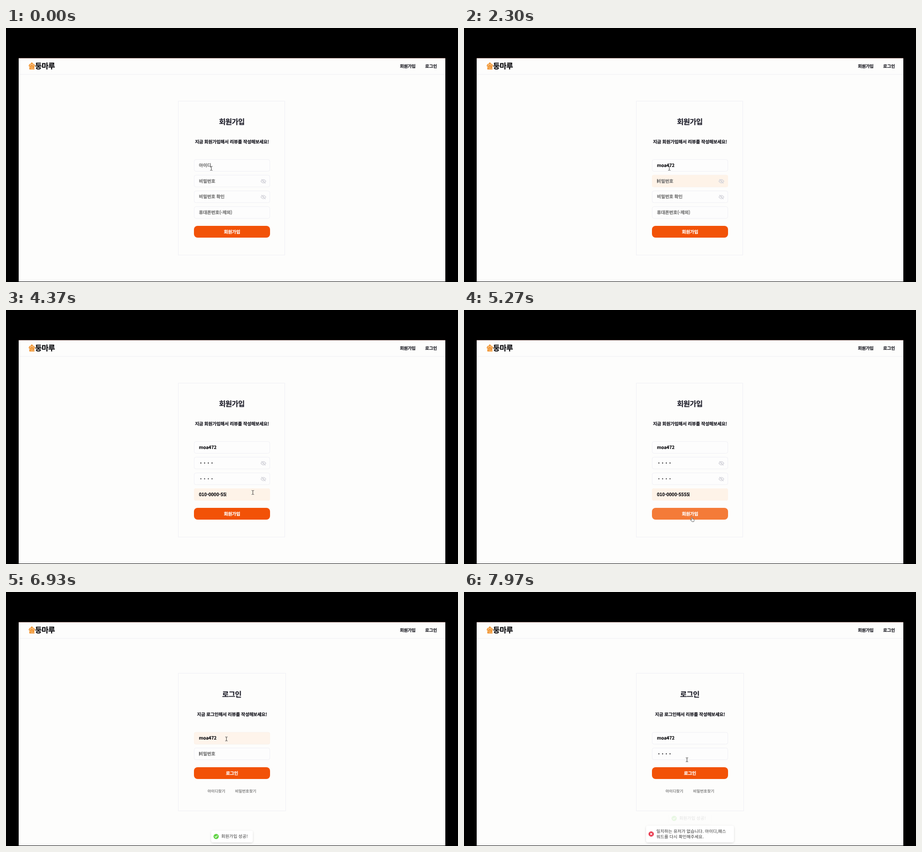
These frames come from a looping animation (998 px wide and 561 px high, 8000 ms). An HTML page:

```html
<!DOCTYPE html>
<html lang="ko">
<head>
<meta charset="utf-8">
<title>회원가입</title>
<style>
  html, body { margin: 0; width: 100%; height: 100%; overflow: hidden; background: #000; }
  svg { display: block; width: 998px; height: 561px; }
  text { font-family: "Noto Sans CJK KR", "Noto Sans CJK", "Noto Sans", sans-serif; text-rendering: geometricPrecision; white-space: pre; }
</style>
</head>
<body>
<svg id="stage" viewBox="0 0 998 561" xmlns="http://www.w3.org/2000/svg"></svg>
<script>
const LOOP = 8000;
const SWAP = 5440;
const INK = '#17171f', HINT = '#757575', LINE = '#efeff4';
const ORANGE = [242, 82, 7], HOVER = [244, 123, 56];
const stage = document.getElementById('stage');

const clamp = v => Math.max(0, Math.min(1, v));
const ramp = (t, start, length) => clamp((t - start) / length);
const easeOut = p => 1 - Math.pow(1 - p, 3);
const smooth = p => p * p * (3 - 2 * p);
const show = (el, on) => el.setAttribute('visibility', on ? 'inherit' : 'hidden');

function add(parent, tag, attrs = {}) {
  const el = document.createElementNS('http://www.w3.org/2000/svg', tag);
  for (const k in attrs) el.setAttribute(k, attrs[k]);
  parent.appendChild(el);
  return el;
}

const box = (parent, x, y, width, height, attrs) =>
  add(parent, 'rect', { x, y, width, height, ...attrs });

// y is the optical middle of the line
function label(parent, str, x, y, size, opts = {}) {
  const { fill = INK, weight = 900, anchor = 'start', gap = 0 } = opts;
  const el = add(parent, 'text', {
    x, y: y + size * 0.365, fill, 'font-size': size, 'font-weight': weight,
    'text-anchor': anchor, 'letter-spacing': gap
  });
  if (weight === 900) {
    el.setAttribute('stroke', fill);
    el.setAttribute('stroke-width', 0.2);
  }
  el.textContent = str;
  return el;
}

function eyeOff(parent, x, y) {
  const g = add(parent, 'g', {
    transform: `translate(${x} ${y})`, fill: 'none', stroke: '#d3d3da', 'stroke-width': 1.3
  });
  add(g, 'path', { d: 'M-5.5 0Q0 -7.5 5.5 0Q0 7.5 -5.5 0Z' });
  add(g, 'circle', { r: 1.7, fill: '#d3d3da', stroke: 'none' });
  add(g, 'path', { d: 'M-4.5 -4.5L4.7 4.7' });
}

const fields = [];
function field(parent, y, hint, opts = {}) {
  box(parent, 415.5, y + 0.5, 167, 26, { rx: 4, fill: '#fdfdfd', stroke: LINE });
  const f = { y, value: '', keys: [], ...opts };
  f.tint = box(parent, 415, y, 168, 27, { rx: 4, fill: '#fef3e8', opacity: 0 });
  f.hint = label(parent, hint, 426, y + 13.5, 9.9, { fill: HINT, gap: -0.1 });
  f.text = label(parent, '', 426, y + 13, 10, { fill: '#0c0c10', gap: -0.1 });
  f.dots = [0, 1, 2, 3].map(i =>
    add(parent, 'circle', { cx: 430.3 + i * 8.2, cy: y + 13.5, r: 1.15, fill: '#0c0c10' }));
  f.caret = box(parent, 0, y + 9, 0.9, 9, { fill: '#222' });
  if (f.eye) eyeOff(parent, 568.3, y + 14);
  fields.push(f);
}

function button(parent, y, str) {
  const el = box(parent, 415, y, 168, 26, { rx: 8, fill: `rgb(${ORANGE})` });
  label(parent, str, 499, y + 13, 10, { fill: '#fff', anchor: 'middle', gap: -0.2 });
  return el;
}

function card(y, width, height, title, titleY, note) {
  const g = add(page, 'g');
  box(g, 380.5, y + 0.5, width, height, { fill: 'none', stroke: LINE });
  label(g, title, 498.5, titleY, 16, { fill: '#20202c', anchor: 'middle', gap: -0.6 });
  label(g, note, 499, titleY + 43.5, 10, { anchor: 'middle', gap: -0.25 });
  return g;
}

const every = (start, step, n) => Array.from({ length: n }, (_, i) => start + i * step);

// Page frame
const defs = add(stage, 'defs');
box(add(defs, 'clipPath', { id: 'view' }), 28, 66, 942, 494);
const soft = add(defs, 'filter', { id: 'soft', x: '-20%', y: '-50%', width: '140%', height: '220%' });
add(soft, 'feDropShadow', { dx: 0, dy: 1.5, stdDeviation: 2.2, 'flood-color': '#000', 'flood-opacity': 0.14 });

box(stage, 0, 0, 998, 561, { fill: '#000' });
const page = add(stage, 'g', { 'clip-path': 'url(#view)' });
box(page, 28, 66, 942, 494, { fill: '#fdfdfc' });
box(page, 28, 65.5, 942, 1.5, { fill: '#6b443d' });
box(page, 28, 102, 942, 1, { fill: LINE });
const brand = label(page, '', 49.5, 83.5, 16.5, { fill: '#08080c', gap: -0.6 });
[['솔', '#f08a1d'], ['둥마루', '#08080c']].forEach(([str, fill]) => {
  add(brand, 'tspan', { fill, stroke: fill }).textContent = str;
});
label(page, '회원가입', 869.7, 84, 9.6, { gap: -0.2 });
label(page, '로그인', 925.5, 84, 9.6, { gap: -0.1 });

// Sign-up card
const USER = 'moa472', PHONE = '010-0000-5555';
const signup = card(161, 235, 340, '회원가입', 207.5, '지금 회원가입해서 리뷰를 작성해보세요!');
field(signup, 290, '아이디', {
  value: USER, keys: [1520, 1600, 1680, 1780, 2040, 2090], tint0: 1400, tint1: 2150, caret1: 2150
});
field(signup, 324.5, '비밀번호', {
  secret: true, eye: true, keys: every(2370, 80, 4), tint0: 2150, tint1: 2790, caret1: 2790
});
field(signup, 359.3, '비밀번호 확인', {
  secret: true, eye: true, keys: every(2960, 90, 4), tint0: 2790, tint1: 3400, caret1: 3690
});
field(signup, 394, '휴대폰번호(-제외)', {
  value: PHONE, keys: every(3760, 56, 13), tint0: 3690, tint1: SWAP, caret1: SWAP
});
const joinButton = button(signup, 437, '회원가입');

// Login card
const login = card(179, 237, 304, '로그인', 226.5, '지금 로그인해서 리뷰를 작성해보세요!');
field(login, 309.5, '아이디', {
  value: USER, keys: every(6400, 85, 6), tint0: 6280, tint1: 6910, caret1: 6910
});
field(login, 344, '비밀번호', {
  secret: true, keys: every(7080, 90, 4), tint0: 6930, caret0: 6910, tint1: 7460, caret1: 7460
});
button(login, 387, '로그인');
label(login, '아이디찾기', 445, 440, 8.5, { fill: '#858585', weight: 700 });
label(login, '비밀번호찾기', 505.8, 440, 8.5, { fill: '#858585', weight: 700, gap: -0.05 });

// Toasts
function toast(x, y, w, h, color, lines, textX, iconX, iconPath) {
  const g = add(page, 'g');
  box(g, x, y, w, h, { rx: 4.5, fill: '#fff', filter: 'url(#soft)' });
  const cy = y + h / 2;
  const icon = add(g, 'g');
  add(icon, 'circle', { r: 5.8, fill: color });
  const mark = add(icon, 'path', {
    d: iconPath, fill: 'none', stroke: '#fff', 'stroke-width': 1.4,
    'stroke-linecap': 'round', pathLength: 1, 'stroke-dasharray': '1 2'
  });
  lines.forEach((str, i) =>
    label(g, str, textX, cy + (i - (lines.length - 1) / 2) * 11.5, 9.55, { fill: '#363636', weight: 400 }));
  return { g, icon, mark, cx: x + w / 2, cy, h, iconX };
}
const good = toast(453, 527, 92, 26, '#61d345', ['회원가입 성공!'], 475.3, 464, 'M-2.5 .2L-.7 2L2.6 -1.8');
const bad = toast(402, 516, 194, 37, '#e8364b',
  ['일치하는 유저가 없습니다. 아이디,패스', '워드를 다시 확인해주세요.'], 424.7, 413.3,
  'M-2 -2L2 2M2 -2L-2 2');

function drawToast(o, t, start, lift, fade) {
  show(o.g, t >= start);
  const p = easeOut(ramp(t, start, 350));
  const s = 0.6 + 0.4 * p;
  o.g.setAttribute('transform',
    `translate(${o.cx} ${o.cy + 2 * o.h * (1 - p) - lift}) scale(${s}) translate(${-o.cx} ${-o.cy})`);
  o.g.setAttribute('opacity', (0.5 + 0.5 * p) * fade);
  const k = easeOut(ramp(t, start + 70, 220));
  o.icon.setAttribute('transform', `translate(${o.iconX} ${o.cy}) scale(${k})`);
  const m = ramp(t, start + 260, 200);
  o.mark.setAttribute('stroke-dashoffset', 1 - m);
  show(o.mark, t >= start && m > 0);
}

// Pointer
const pointer = add(stage, 'g');
const shapes = {
  beam: add(pointer, 'path', {
    d: 'M-2.5 -4.5Q0 -4.5 0 -3.5Q0 -4.5 2.5 -4.5M0 -3.5V3.5M-2.5 4.5Q0 4.5 0 3.5Q0 4.5 2.5 4.5',
    fill: 'none', stroke: '#333', 'stroke-width': 1
  }),
  hand: add(pointer, 'path', {
    d: 'M-1 .5Q0 -.8 1 .5V3.5L4.2 4.3Q5.2 4.8 5 6L4.2 9.5H-.2L-3.3 5.8Q-3 4.6 -1 6Z',
    fill: '#fff', stroke: '#444', 'stroke-width': 0.8, 'stroke-linejoin': 'round'
  }),
  arrow: add(pointer, 'path', {
    d: 'M0 0V8.6L2 6.8L3.4 9.8L4.8 9.2L3.5 6.2H6.1Z',
    fill: '#fff', stroke: '#555', 'stroke-width': 0.8, 'stroke-linejoin': 'round'
  })
};
const route = [
  [0, 453.3, 310], [2480, 453.3, 310], [2800, 564.5, 377.5], [3570, 564.5, 377.5],
  [3670, 545, 403], [4610, 545, 403], [5000, 503.3, 458], [5440, 503.3, 458],
  [5700, 495.3, 453], [5950, 495.3, 453], [6250, 486.7, 324.5], [7480, 486.7, 324.5],
  [7800, 492.3, 370.5], [LOOP, 492.3, 370.5]
];

function drawPointer(t) {
  const i = Math.max(1, route.findIndex(r => r[0] > t));
  const [t0, x0, y0] = route[i - 1], [t1, x1, y1] = route[i];
  const p = smooth(ramp(t, t0, t1 - t0));
  const x = x0 + (x1 - x0) * p, y = y0 + (y1 - y0) * p;
  const late = t >= SWAP;
  const buttonY = late ? 387 : 437;
  const overField = fields.slice(late ? 4 : 0, late ? 6 : 4).some(f => y >= f.y && y <= f.y + 27);
  const kind = overField ? 'beam' : y >= buttonY && y <= buttonY + 26 ? 'hand' : 'arrow';
  pointer.setAttribute('transform', `translate(${x} ${y})`);
  for (const k in shapes) show(shapes[k], k === kind);
}

function drawField(f, t) {
  const n = f.keys.filter(k => k <= t).length;
  show(f.hint, n === 0);
  f.dots.forEach((d, i) => show(d, f.secret && i < n));
  const str = f.secret ? '' : f.value.slice(0, n);
  if (f.text.textContent !== str) f.text.textContent = str;
  f.tint.setAttribute('opacity', ramp(t, f.tint0, 100) * (1 - ramp(t, f.tint1, 150)));
  const width = !n ? 0.6 : f.secret ? n * 8.2 - 0.8 : f.text.getComputedTextLength();
  f.caret.setAttribute('x', 426 + width);
  show(f.caret, t >= (f.caret0 || f.tint0) && t < f.caret1);
}

function draw(t) {
  show(signup, t < SWAP);
  show(login, t >= SWAP);
  fields.forEach(f => drawField(f, t));
  const h = ramp(t, 4900, 150);
  joinButton.setAttribute('fill', `rgb(${ORANGE.map((c, i) => Math.round(c + (HOVER[i] - c) * h))})`);
  const lift = 40 * easeOut(ramp(t, 7500, 230));
  drawToast(good, t, SWAP, lift, 1 - 0.87 * ramp(t, 7680, 280));
  drawToast(bad, t, 7500, 0, 1);
  drawPointer(t);
}

const begin = performance.now();
function tick() {
  draw((performance.now() - begin) % LOOP);
  requestAnimationFrame(tick);
}
tick();
</script>
</body>
</html>
```
